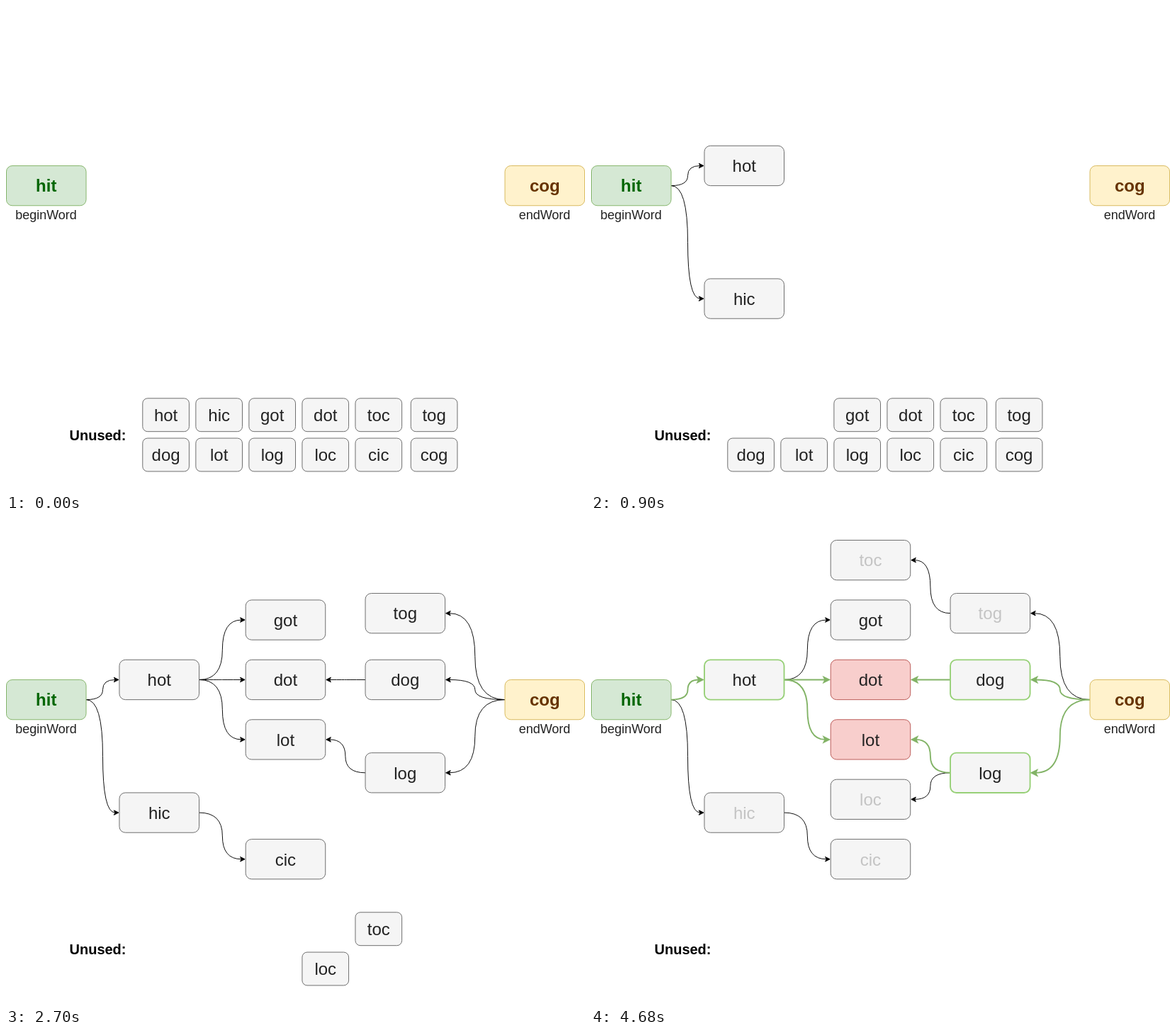
An HTML page that plays this animation: 817x686 px, repeating every 5.4 s.

```html
<!DOCTYPE html>
<html lang="en">
<head>
<meta charset="utf-8">
<title>Bidirectional word ladder</title>
<style>
  html, body { margin: 0; width: 100%; height: 100%; overflow: hidden; background: #fff; }
  svg { display: block; }
  text { font: 24px "Liberation Sans", Arial, sans-serif; text-anchor: middle; fill: #222; }
  .bold { font-weight: bold; }
  .label { font-size: 18px; }
  .title { font-size: 20px; fill: #000; }
</style>
</head>
<body>
<svg id="stage" width="817" height="686" viewBox="0 0 817 686"></svg>
<script>
const stage = document.getElementById('stage');
const S = 0.938, STEP = 900, LOOP = 5400, LAST = 4;
const W = 120, H = 60;                      // node size in diagram units
const px = x => 0.5 + x * S, py = y => 28.5 + y * S;

// word: [x, y, step at which it appears]
const nodes = {
  hit: [0, 210, 0], cog: [750, 210, 0],
  hot: [170, 180, 1], hic: [170, 380, 1],
  tog: [540, 80, 2], dog: [540, 180, 2], log: [540, 320, 2],
  got: [360, 90, 3], dot: [360, 180, 3], lot: [360, 270, 3], cic: [360, 450, 3],
  toc: [360, 0, 4], loc: [360, 360, 4]
};
const edges = ['hit hic', 'hot got', 'hic cic', 'cog tog', 'tog toc', 'log loc',
  'hit hot', 'hot dot', 'hot lot', 'cog dog', 'cog log', 'dog dot', 'log lot'];
const onPath = ['hit', 'hot', 'dot', 'lot', 'dog', 'log', 'cog'];
const unused = ['hot hic got dot toc tog', 'dog lot log loc cic cog'];

const plain = { fill: '#f5f5f5', stroke: '#666' };
const faded = { ...plain, color: '#c4c4c4' };
const path = { ...plain, stroke: '#97d077', width: 2 };
const meet = { fill: '#f8cecc', stroke: '#b85450' };
const ends = {
  hit: { fill: '#d5e8d4', stroke: '#82b366', color: '#060', bold: true },
  cog: { fill: '#fff2cc', stroke: '#d6b656', color: '#630', bold: true }
};

function styleOf(word, step) {
  if (ends[word]) return ends[word];
  if (step < LAST || word === 'got') return plain;
  if (word === 'dot' || word === 'lot') return meet;
  return onPath.includes(word) ? path : faded;
}

function box(word, x, y, w, h, { fill, stroke, color = '#222', width = 1, bold }) {
  return `<rect x="${px(x)}" y="${py(y)}" width="${w * S}" height="${h * S}" rx="${h * 0.15 * S}"
    fill="${fill}" stroke="${stroke}" stroke-width="${width * S}"/>
    <text x="${px(x + w / 2)}" y="${py(y + h / 2) + 8.8}" style="fill:${color}"
    class="${bold ? 'bold' : ''}">${word}</text>`;
}

function edge(from, to, step) {
  const [ax, ay] = nodes[from], [bx, by] = nodes[to];
  const dir = bx > ax ? 1 : -1;
  const lit = step === LAST && onPath.includes(from) && onPath.includes(to);
  const color = lit ? '#82b366' : '#000', width = lit ? 2 : 1, size = 6 + width;
  const x1 = px(dir > 0 ? ax + W : ax), x2 = px(dir > 0 ? bx : bx + W);
  const y1 = py(ay + H / 2), y2 = py(by + H / 2), mid = (x1 + x2) / 2;
  const tip = x2 - dir * 1.118 * width * S;
  const notch = tip - dir * size * 0.75 * S, back = tip - dir * size * S, half = size / 2 * S;
  return `<g stroke="${color}" stroke-width="${width * S}" stroke-miterlimit="10">
    <path fill="none" d="M${x1} ${y1}Q${mid} ${y1} ${mid} ${(y1 + y2) / 2}Q${mid} ${y2} ${notch} ${y2}"/>
    <path fill="${color}" d="M${tip} ${y2}L${back} ${y2 + half}L${notch} ${y2}L${back} ${y2 - half}Z"/></g>`;
}

function scene(step) {
  let out = `<text class="label" x="56.5" y="301">beginWord</text>
    <text class="label" x="760" y="301">endWord</text>
    <text class="title bold" x="129.5" y="613">Unused:</text>`;
  for (const e of edges) {
    const [from, to] = e.split(' ');
    if (nodes[to][2] <= step) out += edge(from, to, step);
  }
  for (const word in nodes) {
    const [x, y, start] = nodes[word];
    if (start <= step) out += box(word, x, y, W, H, styleOf(word, step));
  }
  unused.forEach((row, r) => row.split(' ').forEach((word, c) => {
    const usedAt = word === 'cog' ? 2 : nodes[word][2];
    const x = 205 + c * 80 + (c === 5 ? 3.5 : 0);
    if (step < usedAt) out += box(word, x, 560 + r * 60, 70, 50, plain);
  }));
  return out;
}

let shown = -1;
function draw() {
  const step = Math.min(LAST, Math.floor(performance.now() % LOOP / STEP));
  if (step !== shown) stage.innerHTML = scene(shown = step);
  requestAnimationFrame(draw);
}
draw();
</script>
</body>
</html>
```
